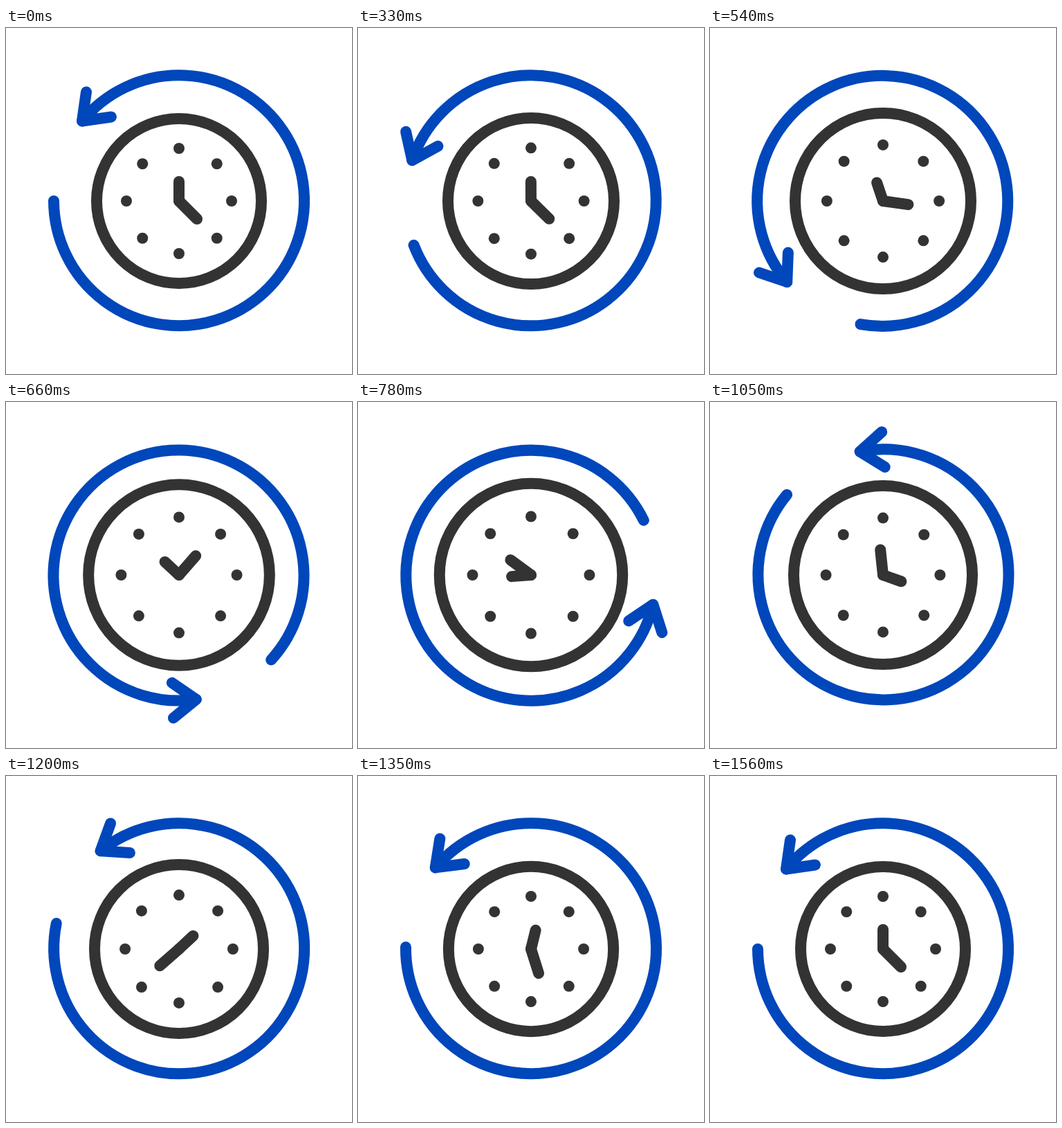
Animation of 500x500 px, one loop 1.62 s. Source, as an HTML page:

```html
<!DOCTYPE html>
<html lang="en">
<head>
<meta charset="utf-8">
<title>Clock turning back</title>
<style>
  html, body { margin: 0; height: 100%; overflow: hidden; background: #fff; }
  svg { display: block; width: 100vw; height: 100vh; }
  .line { fill: none; stroke-width: 16; stroke-linecap: round; stroke-linejoin: round; }
  .blue { stroke: #0047bb; }
  .dark { stroke: #333; }
</style>
</head>
<body>
<svg viewBox="-250 -250 500 500">
  <g id="arrow" class="line blue">
    <path d="M-181 0A181 181 0 1 0-140-115.5"/>
    <path d="M-134-157.5L-140-115.5L-98-121.5"/>
  </g>
  <circle id="rim" class="line dark"/>
  <g id="dots" fill="#333"></g>
  <path id="hour" class="line dark" d="M0 0V-28"/>
  <path id="minute" class="line dark" d="M0 0L26 26"/>
</svg>
<script>
const LOOP = 1620, STEP = 30;
const get = id => document.getElementById(id);
const [arrow, rim, dotGroup, hour, minute] = ['arrow', 'rim', 'dots', 'hour', 'minute'].map(get);

const dots = Array.from({ length: 8 }, () => {
  const dot = document.createElementNS('http://www.w3.org/2000/svg', 'circle');
  dot.setAttribute('r', 8);
  return dotGroup.appendChild(dot);
});

// Cubic Bezier ease (0.54, 0, 0.46, 1), solved by bisection
function ease(x) {
  if (x <= 0) return 0;
  if (x >= 1) return 1;
  let low = 0, high = 1, u;
  for (let i = 0; i < 30; i++) {
    u = (low + high) / 2;
    const v = 1 - u;
    if (1.62 * u * v * v + 1.38 * u * u * v + u * u * u < x) low = u;
    else high = u;
  }
  return u * u * (3 - 2 * u);
}

const progress = (time, start, end) => ease((time - start) / (end - start));
const turn = (node, degrees) => node.setAttribute('transform', `rotate(${-degrees})`);

function draw(time) {
  turn(arrow, 360 * progress(time, 60, 1410));
  const spin = progress(time, 300, 1560);
  turn(hour, 360 * spin);
  turn(minute, 720 * spin);

  const radius = 119 + 13.4 * (progress(time, 180, 840) - progress(time, 840, 1400));
  rim.setAttribute('r', radius);
  dots.forEach((dot, i) => {
    const angle = i * Math.PI / 4, reach = radius * 76 / 119;
    dot.setAttribute('cx', reach * Math.cos(angle) + (i % 2));
    dot.setAttribute('cy', reach * Math.sin(angle));
  });
}

function tick() {
  const time = performance.now() % LOOP;
  draw(Math.floor(time / STEP) * STEP);
  requestAnimationFrame(tick);
}
tick();
</script>
</body>
</html>
```
